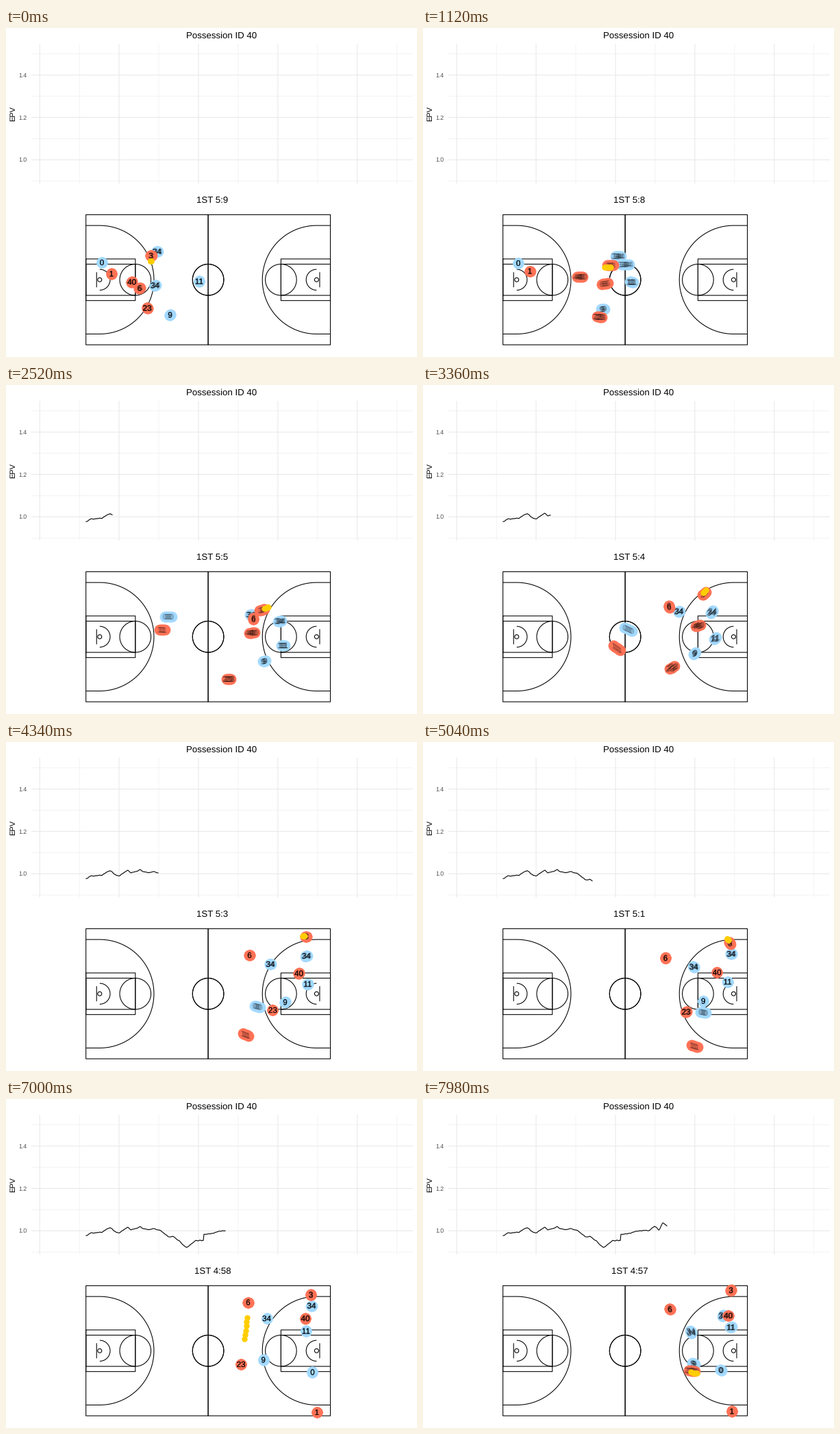
Recreate the animation shown at these times as a matplotlib script. Size 600x480 px, loop 8 s.

```python
import numpy as np
import matplotlib.pyplot as plt
from matplotlib.animation import FuncAnimation
from matplotlib.collections import LineCollection, PathCollection
from matplotlib.path import Path
from matplotlib.textpath import TextPath
from matplotlib.transforms import IdentityTransform

W, H, DPI = 600, 480, 72          # at 72 dpi one point is one pixel
TICK, HOLD, LOOP = 20, 140, 8000  # ms
RED, BLUE, GOLD = "#ff7256", "#a2d9ff", "#ffcd00"
FONT = "Liberation Sans"

plt.rcParams.update({"font.family": FONT, "text.hinting": "none"})
fig = plt.figure(figsize=(W / DPI, H / DPI), dpi=DPI, facecolor="white")
ax = fig.add_axes([0, 0, 1, 1])
ax.set(xlim=(0, W), ylim=(H, 0))
ax.set_autoscale_on(False)
ax.axis("off")


def strokes(lines, color="black", width=1.07, z=1):
    ax.add_collection(LineCollection(lines, colors=color, linewidths=width,
                                     snap=False, zorder=z), autolim=False)


# --- chart panel: major grid on even steps, minor on odd ones
def grid_y(n):
    return 37.8 + 30.9 * n


for odd, color, width in ((1, "#ebebeb", 0.55), (0, "#e9e9e9", 1.1)):
    strokes([[(37, grid_y(n)), (594, grid_y(n))] for n in range(1 - odd, 7, 2) if n or odd]
            if odd else [[(37, grid_y(n)), (594, grid_y(n))] for n in (1, 3, 5)],
            color, width, 0)
    strokes([[(x, 23), (x, 227)] for x in np.arange(49.2 + 57.95 * odd, 594, 115.9)],
            color, width, 0)

for n, s in ((1, "1.4"), (3, "1.2"), (5, "1.0")):
    ax.text(31, grid_y(n) + 3.1, s, size=8.8, color="#4d4d4d", ha="right")
ax.text(10, 125, "EPV", size=11, rotation=90, ha="center", va="center")
ax.text(315, 15.3, "Possession ID 40", size=13.2, ha="center")
clock = ax.text(301.5, 255.3, "", size=13.2, ha="center")

# --- court, in feet from the centre of the left baseline
FOOT, MID, CY = 3.796, 295.1, 367.3


def arc(cx, r, a=0, b=360):
    t = np.radians(np.linspace(a, b, 121))
    return np.column_stack([cx + r * np.cos(t), r * np.sin(t)])


def box(x, y):
    return np.array([(0, -y), (x, -y), (x, y), (0, y), (0, -y)])


RIM, ARC = 5.3, 20.85
half = [
    box(47, 25), box(19, 8), box(19, 6),
    np.array([(4.1, -2.9), (4.1, 2.9)]),
    arc(19, 6), arc(RIM, 0.78), arc(RIM, 4, -90, 90), arc(47, 6),
    np.vstack([(0, -ARC), arc(RIM, ARC, -90, 90), (0, ARC)]),
]
for side in (-1, 1):
    strokes([np.column_stack([MID + side * (47 - p[:, 0]) * FOOT,
                              CY + p[:, 1] * FOOT]) for p in half])

# --- expected value curve: main turns plus a little seeded roughness
TURNS = np.array([
    (117, 199.5), (124, 195.5), (140, 194.5), (152, 187.3), (161, 195),
    (166, 195), (178, 186.5), (182, 191), (196, 187), (207, 191.3),
    (215, 188.7), (226, 192), (237, 201), (244, 199.7), (263.5, 217),
    (277, 206.5), (288, 206.5), (289, 197), (300, 196.5), (314, 192.3),
    (330, 192), (338, 184.8), (344.5, 191.8), (350.3, 180), (357, 186.5)])
rng = np.random.default_rng(4)
epv_x = np.arange(117, 357, 1.0)
epv_y = np.interp(epv_x, *TURNS.T)
epv_y += np.convolve(rng.normal(0, 0.6, epv_x.size), np.ones(3) / 3, "same")
curve, = ax.plot([], [], color="black", lw=1.1, zorder=2)


# --- motion: smooth paths through key points, no overshoot
class Track:
    def __init__(self, times, points):
        self.t, self.p = np.array(times, float), np.array(points, float)
        d = np.diff(self.p, axis=0) / np.diff(self.t)[:, None]
        a, b = d[:-1], d[1:]
        same = a * b > 0
        turn = np.where(same, 2 * a * b / np.where(same, a + b, 1), 0)
        # slow start, full speed at the end
        self.v = np.vstack([d[:1] / 4, turn, d[-1:] * 1.3])

    def __call__(self, t):
        i = np.clip(np.searchsorted(self.t, t, side="right") - 1,
                    0, len(self.t) - 2)
        h = (self.t[i + 1] - self.t[i])[:, None]
        u = (t - self.t[i])[:, None] / h
        w = u * u * (3 - 2 * u)
        return ((1 - w) * self.p[i] + w * self.p[i + 1]
                + h * u * (1 - u) * ((1 - u) * self.v[i] - u * self.v[i + 1]))


STEPS = (0, 8, 18, 31, 42, 50, 57)
TRAIL = np.linspace(-0.5, 0.5, 6)


def dots(color, r, z):
    return ax.scatter([], [], s=(2 * r) ** 2, c=color, linewidths=0, zorder=z)


def number(s, z):
    p = TextPath((0, 0), s, size=11.6, prop={"family": FONT})
    b = p.get_extents()
    mid = ((b.x0 + b.x1) / 2, (b.y0 + b.y1) / 2)
    glyphs = PathCollection([Path(p.vertices - mid, p.codes)],
                            offsets=np.empty((0, 2)),
                            offset_transform=ax.transData,
                            transform=IdentityTransform(),
                            facecolors=(0, 0, 0, 0.36), linewidths=0, zorder=z)
    ax.add_collection(glyphs, autolim=False)
    return glyphs


class Team:
    def __init__(self, color, z):
        self.discs, self.z, self.players = dots(color, 7.9, z), z, []

    def add(self, label, *points):
        self.players.append((Track(STEPS, points), number(label, self.z + 1)))

    def move(self, t):
        trails = [track(t) for track, _ in self.players]
        for pts, (_, glyphs) in zip(trails, self.players):
            glyphs.set_offsets(pts)
        self.discs.set_offsets(np.vstack(trails))


blue = Team(BLUE, 3)
blue.add("0", (140, 342), (139, 343), (237, 338), (367, 386),
         (441, 399.5), (447.5, 398.5), (435, 395.5))
blue.add("34", (220.5, 326), (285, 333), (358, 335), (386, 324),
         (401.5, 333), (380.5, 320), (391.5, 340))
blue.add("34", (217.5, 375.5), (295.5, 345), (400, 344.5), (438.5, 312),
         (457.5, 306.5), (446, 301.5), (438, 316))
blue.add("11", (282, 369.5), (304.5, 370.5), (404.5, 380), (440.5, 353),
         (447, 346.5), (438, 338.5), (449.5, 333))
blue.add("9", (239.5, 418.5), (262.5, 410), (377, 403), (407.5, 379.5),
         (410, 377), (375.5, 380.5), (395, 386))

red = Team(RED, 5)
red.add("3", (211.5, 332), (273.5, 346.5), (374, 328), (438, 283.5),
        (453.5, 305.5), (445, 285.5), (449.5, 279))
red.add("1", (154, 358.5), (156, 354.5), (228, 357), (350, 427),
        (437, 455), (454, 457), (451, 455.5))
red.add("40", (183.5, 370.5), (229, 363), (359, 361.5), (427.5, 337.5),
        (430.5, 334.5), (437, 320), (445.5, 316))
red.add("6", (195, 379.5), (265.5, 373), (361.5, 341), (355.5, 311),
        (353, 320.5), (353.5, 296.5), (360.5, 306.5))
red.add("23", (206, 408.5), (257.5, 421.5), (325, 429), (389.5, 391),
        (370.5, 397), (343, 387), (392.5, 396.5))

# the ball is carried up the court, then goes in straight passes
carry = Track(STEPS[:5], [(211.3, 339.7), (269, 349.5), (380.5, 325),
                          (434.5, 282.5), (457, 301.5)])
PASSES = np.array([(42, 457, 301.5), (43.5, 458, 301), (46.5, 356, 304),
                   (49.15, 353.5, 308.5), (51.55, 344, 382),
                   (57, 395.5, 400), (58, 405, 399)])
ball = dots(GOLD, 4.2, 7)


def ball_path(t):
    flight = np.column_stack([np.interp(t, PASSES[:, 0], PASSES[:, c])
                              for c in (1, 2)])
    return np.where((t < PASSES[0, 0])[:, None], carry(t), flight)


def update(i):
    k = i * TICK // HOLD
    t = k + TRAIL
    blue.move(t)
    red.move(t)
    ball.set_offsets(ball_path(t))

    left = int(309.9 - 0.22 * k)
    clock.set_text(f"1ST {left // 60}:{left % 60}")

    seen = epv_x <= 62.3 + 5.155 * k
    curve.set_data(epv_x[seen], epv_y[seen])


anim = FuncAnimation(fig, update, frames=LOOP // TICK, init_func=lambda: update(0),
                     interval=TICK, repeat=True, repeat_delay=0,
                     cache_frame_data=False)
plt.show()
```
